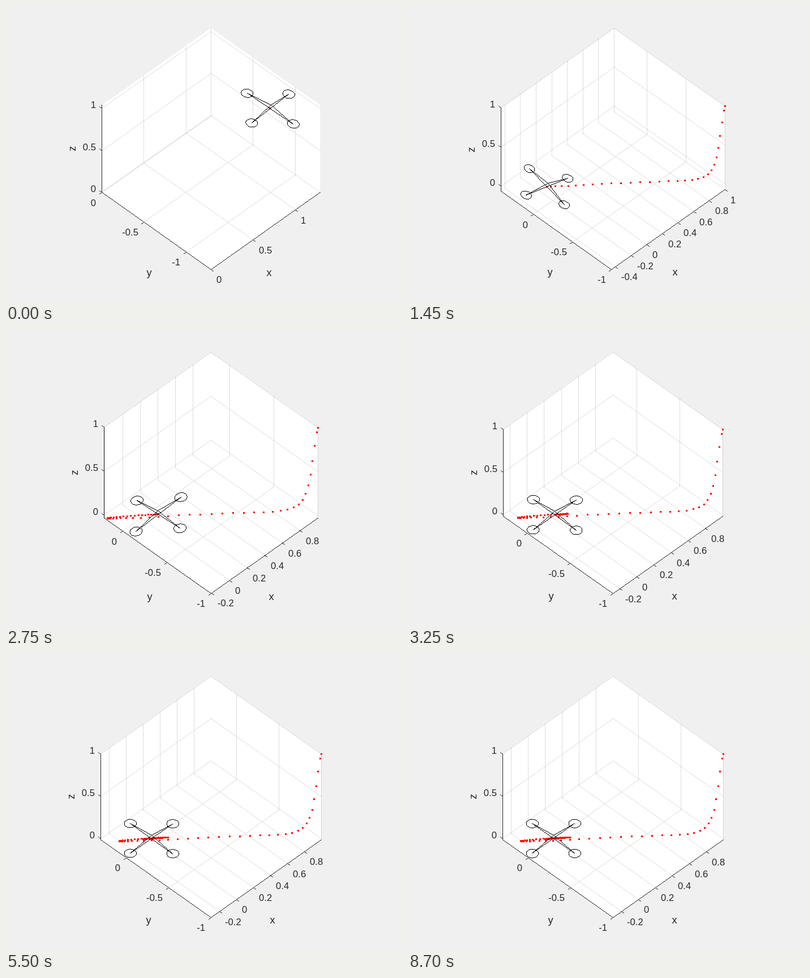
Animation of 700x525 px, one loop 8.75 s. Source, as an HTML page with a canvas:

```html
<!DOCTYPE html>
<html lang="en">
<head>
<meta charset="utf-8">
<title>Quadrotor flight</title>
<style>
  html, body { margin: 0; width: 100%; height: 100%; overflow: hidden; background: #f0f0f0; }
  canvas { display: block; }
</style>
</head>
<body>
<canvas id="stage" width="700" height="525"></canvas>
<script>
const ctx = document.getElementById('stage').getContext('2d');
const STEP = 50, COUNT = 175;
const INK = '#262626', GRID = 'rgba(38,38,38,0.15)';
const FONT = '"Liberation Sans", Arial, sans-serif';
const ARM = 0.25, ROTOR = 0.05, HUB = 0.04;

// Smooth curve through [position, value] pairs.
function spline(keys) {
  const slope = i => {
    const a = keys[Math.max(i - 1, 0)], b = keys[Math.min(i + 1, keys.length - 1)];
    return (b[1] - a[1]) / (b[0] - a[0]);
  };
  return n => {
    const last = keys.length - 1;
    if (n >= keys[last][0]) return keys[last][1];
    let i = 0;
    while (n >= keys[i + 1][0]) i++;
    const [n0, v0] = keys[i], [n1, v1] = keys[i + 1];
    const h = n1 - n0, s = (n - n0) / h, s2 = s * s, s3 = s2 * s;
    return v0 * (2 * s3 - 3 * s2 + 1) + v1 * (3 * s2 - 2 * s3) +
      h * (slope(i) * (s3 - 2 * s2 + s) + slope(i + 1) * (s3 - s2));
  };
}

// Flight: spread is x - y, drift is x + y; both end in a damped swing.
const SWING = 28, W = Math.PI / 21.3, DAMP = 0.0317;
const swing = (n, amp, lead) =>
  amp * Math.exp(-DAMP * (n - 45.8)) * Math.sin(W * (n - 45.8 + lead));

const spreadStart = spline([[0, 2], [1, 1.988], [2, 1.963], [4, 1.916], [6, 1.864],
  [8, 1.783], [10, 1.657], [12, 1.49], [14, 1.28], [17, 0.919], [20, 0.546],
  [23, 0.193], [26, -0.09], [28, -0.231], [30, -0.319]]);
const driftStart = spline([[0, 0], [4, 0], [8, 0.02], [14, 0.05], [20, 0.03],
  [24, -0.012], [28, -0.03], [33, -0.039]]);
const height = spline([[0, 1], [1, 0.945], [2, 0.795], [3, 0.622], [4, 0.465],
  [5, 0.338], [6, 0.24], [7, 0.165], [8, 0.11], [10, 0.045], [12, 0.012], [14, 0],
  [17, -0.01], [20, -0.014], [24, -0.013], [28, -0.009], [36, -0.003], [45, 0]]);
const tiltXStart = spline([[0, -0.1], [2, 0.03], [4, 0.05], [8, 0.13], [14, 0.154],
  [17, 0.03], [22, -0.12], [28, -0.19]]);
const tiltYStart = spline([[0, 0.1], [2, -0.03], [4, -0.08], [9, -0.1], [14, 0.08],
  [19, 0.1], [24, 0.15], [28, 0.19]]);
const yawAt = spline([[0, 0.11], [5, 0.01], [14, -0.12], [25, -0.1], [45, -0.044],
  [65, -0.004], [80, 0]]);

const spread = n => n < SWING ? spreadStart(n) : swing(n, 0.267, 0);
const drift = n => n < SWING ? driftStart(n) : swing(n, 0.026, 1.5);

function poseAt(n) {
  const u = spread(n), w = drift(n);
  let tx, ty;
  if (n < SWING) {
    tx = tiltXStart(n);
    ty = tiltYStart(n);
  } else {
    const s = k => swing(k, 0.267, 0);
    tx = -20.5 * (s(n + 1) - 2 * s(n) + s(n - 1));
    ty = -tx;
  }
  return { pos: [(u + w) / 2, (w - u) / 2, height(n)], tx, ty, yaw: yawAt(n) };
}

const poses = Array.from({ length: COUNT }, (_, n) => poseAt(n));

function buildDrone({ pos, tx, ty, yaw }) {
  const add = (p, d, k) => p.map((v, i) => v + d[i] * k);
  const dir = angle => {
    const c = Math.cos(angle), s = Math.sin(angle), z = tx * c + ty * s;
    const len = Math.hypot(1, z);
    return [c / len, s / len, z / len];
  };
  const len = Math.hypot(tx, ty, 1);
  const top = add(pos, [-tx / len, -ty / len, 1 / len], HUB);
  const hubs = [0, 1, 2, 3].map(i => add(pos, dir(yaw + i * Math.PI / 2), ARM));
  const rings = hubs.map(hub => Array.from({ length: 33 },
    (_, i) => add(hub, dir(yaw + i * Math.PI / 16), ROTOR)));
  return { top, hubs, rings };
}

// One-pixel line without smoothing.
function line(a, b) {
  const x0 = Math.floor(a[0]), y0 = Math.floor(a[1]);
  const dx = Math.floor(b[0]) - x0, dy = Math.floor(b[1]) - y0;
  const n = Math.max(Math.abs(dx), Math.abs(dy));
  if (!dx || !dy) {
    ctx.fillRect(x0 + Math.min(dx, 0), y0 + Math.min(dy, 0), Math.abs(dx) + 1, Math.abs(dy) + 1);
    return;
  }
  for (let i = 0; i <= n; i++)
    ctx.fillRect(x0 + Math.round(dx * i / n), y0 + Math.round(dy * i / n), 1, 1);
}

function path(points) {
  for (let i = 1; i < points.length; i++) line(points[i - 1], points[i]);
}

function ticks(min, max, step) {
  const out = [];
  for (let k = Math.ceil(min / step - 1e-6); k * step <= max + 1e-6; k++)
    out.push(Math.round(k * step * 10) / 10);
  return out;
}

function text(str, x, y, align) {
  ctx.textAlign = align;
  ctx.fillText(str, Math.round(x), Math.round(y));
}

function draw(n) {
  const drone = buildDrone(poses[n]);
  const trail = poses.slice(0, n + 1).map(p => p.pos);
  const cloud = [[0, 0, 0], [1, -1, 1], drone.top, ...trail, ...drone.rings.flat()];
  const lo = [0, 1, 2].map(i => Math.min(...cloud.map(p => p[i])));
  const hi = [0, 1, 2].map(i => Math.max(...cloud.map(p => p[i])));
  const [rx, ry, rz] = hi.map((v, i) => v - lo[i]);

  // Equal axes seen from 45 degrees, fitted to the plot height.
  const unit = 427.9 / ((rx + ry) * Math.SQRT1_2 + rz);
  const half = unit * (rx + ry) / 2;
  const frontX = 362.25 - half + ry * unit;
  const proj = ([x, y, z]) => {
    const u = x - lo[0], v = y - lo[1];
    return [frontX + unit * (u - v), 467.25 - unit * ((u + v) * Math.SQRT1_2 + z - lo[2])];
  };
  const seg = (a, b) => line(proj(a), proj(b));
  const [x0, y0, z0] = lo, [x1, y1, z1] = hi;

  ctx.fillStyle = '#f0f0f0';
  ctx.fillRect(0, 0, 700, 525);
  ctx.fillStyle = '#fff';
  ctx.beginPath();
  [[x0, y1, z0], [x0, y0, z0], [x1, y0, z0], [x1, y0, z1], [x1, y1, z1], [x0, y1, z1]]
    .forEach(p => ctx.lineTo(...proj(p)));
  ctx.fill();

  const fine = x0 < -1e-6;
  let xt = ticks(x0, x1, fine ? 0.2 : 0.5);
  if (fine && x0 > -0.4) xt = xt.filter(v => v < 1);
  const yt = ticks(y0, y1, 0.5), zt = ticks(z0, z1, 0.5);

  ctx.fillStyle = GRID;
  for (const x of xt) {
    seg([x, y0, z0], [x, y1, z0]);
    seg([x, y1, z0], [x, y1, z1]);
  }
  for (const y of yt) {
    seg([x0, y, z0], [x1, y, z0]);
    seg([x1, y, z0], [x1, y, z1]);
  }
  for (const z of zt) {
    seg([x0, y1, z], [x1, y1, z]);
    seg([x1, y0, z], [x1, y1, z]);
  }

  ctx.fillStyle = INK;
  seg([x0, y1, z0], [x0, y1, z1]);
  seg([x0, y1, z0], [x0, y0, z0]);
  seg([x0, y0, z0], [x1, y0, z0]);

  ctx.font = '16.67px ' + FONT;
  const mark = (p, value, tx, ty, lx, ly, align) => {
    const [x, y] = proj(p);
    line([x, y], [x + tx, y + ty]);
    text(String(value), x + lx, y + ly, align);
  };
  for (const x of xt) mark([x, y0, z0], x, 4, 3, 10, 24, 'left');
  for (const y of yt) mark([x0, y, z0], y, -4, 3, -10, 24, 'right');
  for (const z of zt) mark([x0, y1, z], z, -4, -3, -10, -0.5, 'right');

  ctx.font = '18.33px ' + FONT;
  const grow = half - 193.2, labelY = 478.5 - 0.16 * grow;
  text('x', 465 + 0.32 * grow + (fine ? 5.5 : 0), labelY, 'center');
  text('y', 253 - 0.32 * grow, labelY, 'center');
  const left = proj([x0, y1, (z0 + z1) / 2]);
  ctx.save();
  ctx.translate(Math.round(left[0] - 46), Math.round(left[1]));
  ctx.rotate(-Math.PI / 2);
  text('z', 0, 0, 'center');
  ctx.restore();

  ctx.fillStyle = '#f00';
  for (const p of trail) {
    const [x, y] = proj(p);
    ctx.fillRect(Math.floor(x) - 1, Math.floor(y) - 1, 3, 3);
  }

  ctx.fillStyle = '#000';
  const hubs = drone.hubs.map(proj), top = proj(drone.top);
  for (const i of [0, 1]) {
    line(hubs[i], hubs[i + 2]);
    path([hubs[i], top, hubs[i + 2]]);
  }
  drone.rings.forEach(ring => path(ring.map(proj)));
}

const start = performance.now();
let shown = -1;
function tick() {
  const n = Math.floor((performance.now() - start) / STEP) % COUNT;
  if (n !== shown) draw(shown = n);
  requestAnimationFrame(tick);
}
tick();
</script>
</body>
</html>
```
